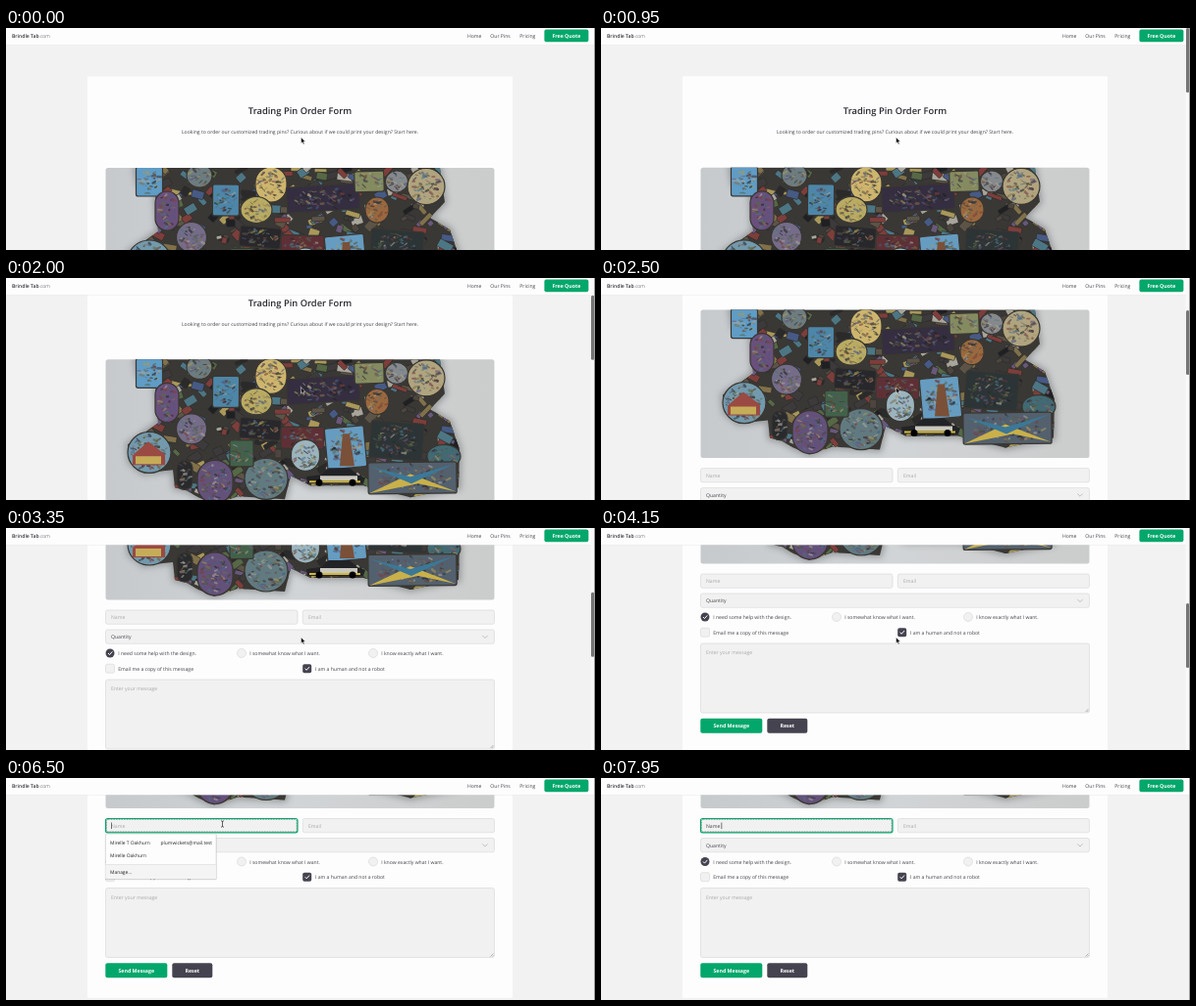
An HTML page that plays this animation: 600x227 px, repeating every 8 s.

```html
<!DOCTYPE html>
<html lang="en">
<head>
<meta charset="utf-8">
<title>Order form</title>
<style>
  html, body { margin: 0; width: 100%; height: 100%; overflow: hidden; background: #f2f2f2; }
  svg { display: block; width: 100%; height: 100%; }
  text { font: 400 5.1px "Open Sans", sans-serif; fill: #45444c; white-space: pre; text-rendering: geometricPrecision; }
  .heading { font-size: 9.35px; font-weight: 600; fill: #2b2a33; text-anchor: middle; }
  .middle { text-anchor: middle; }
  .brand { font-weight: 600; fill: #33323a; }
  .light { font-weight: 300; }
  .button { font-size: 5.25px; font-weight: 700; fill: #fff; text-anchor: middle; }
  .hint { fill: #a9a9ad; }
  .menu text { font-size: 4.9px; fill: #222; }
  .menu .entry { font-weight: 500; }
  .field { fill: #f1f1f1; stroke: #d6d6d8; stroke-width: .6; }
  .dark { fill: #45434f; }
  .green { fill: #04a76b; }
</style>
</head>
<body>
<svg id="stage" viewBox="0 0 600 227"></svg>
<script>
const LOOP = 8000, STEP = 50;
const CLICK = 5450;
const KEY_TIMES = [7000, 7150, 7300, 7450, 7700];
const TYPED = 'Name ';
// time, scroll offset, speed in px per ms
const SCROLL = [[900, 0, 0], [1550, 25.3, .06], [2500, 110.4, .11], [3350, 221, .09], [4150, 258, .05], [4250, 263.5, .03]];

let seed = 11;
const random = () => (seed = seed * 16807 % 2147483647) / 2147483647;
const between = (a, b) => a + (b - a) * random();
const pick = list => list[Math.floor(random() * list.length)];
const clamp = v => Math.max(0, Math.min(1, v));

const text = (x, y, words, cls = '') => `<text x="${x}" y="${y}" class="${cls}">${words}</text>`;
const box = (x, y, w, h, r, cls, extra = '') =>
  `<rect x="${x}" y="${y}" width="${w}" height="${h}" rx="${r}" class="${cls}" ${extra}/>`;
const button = (x, y, w, h, label, cls) =>
  box(x, y, w, h, 2, cls) + text(x + w / 2, y + h / 2 + 1.9, label, 'button');

function option(x, y, label, round, checked) {
  const tick = `<path d="M${x - 2} ${y}l1.5 1.6 2.8-3.2" fill="none" stroke="#fff" stroke-width="1"/>`;
  return box(x - 4.5, y - 4.5, 9, 9, round ? 4.5 : 1.8, checked ? 'dark' : 'field')
    + (checked ? tick : '') + text(x + 8.2, y + 2.1, label);
}

// centre x, centre y, width, height, colour, round
const PINS = [
  [146, 157, 27, 30, '#5f9cc6'], [197, 151, 26, 24, '#6d7c80', 1], [224, 176, 27, 32, '#4d86a8'],
  [270, 160, 32, 36, '#cdb56e', 1], [255, 186, 32, 27, '#b9ab62', 1], [164, 187, 24, 40, '#69507c', 1],
  [189, 214, 31, 31, '#746c88', 1], [146, 238, 44, 42, '#7399ac', 1], [259, 214, 42, 21, '#28272b'],
  [323, 174, 74, 26, '#342e40'], [370, 157, 30, 21, '#858b60'], [398, 157, 23, 22, '#85898c', 1],
  [428, 162, 38, 37, '#b0a47f', 1], [378, 186, 24, 26, '#99683f', 1], [302, 223, 44, 22, '#5e3036'],
  [346, 233, 40, 42, '#669cc0'], [398, 226, 54, 38, '#2c3436'], [446, 242, 34, 24, '#416a72', 1],
  [305, 241, 29, 32, '#9bb4be', 1], [414, 264, 90, 32, '#53606e'], [213, 268, 36, 44, '#63517a', 1],
  [265, 265, 44, 42, '#617a80', 1], [240, 239, 24, 27, '#42614a'], [182, 261, 16, 30, '#292a2c', 1]
];
const TINTS = ['#1f2023', '#2b2a2b', '#3d3a3b', '#4c463f', '#5c5447', '#80714b', '#a9985a', '#7d3e3b', '#4d7684', '#465a84', '#68587a', '#a8a59b', '#566846'];
const PILE = 'M132 143H442L447 178 432 194 452 206 462 235 461 274 412 284 364 272H310L290 262 284 286 236 283 212 291 196 284 184 277 172 274 170 256 140 259 126 248 124 230 155 208 152 165 135 160z';

function chip(x, y, w, h, colour, extra = '') {
  return `<rect x="${-w / 2}" y="${-h / 2}" width="${w}" height="${h}" rx="1" fill="${colour}" ${extra} transform="translate(${x} ${y}) rotate(${between(-50, 50)})"/>`;
}

function pin([x, y, w, h, colour, round]) {
  const tilt = round ? 0 : between(-7, 7);
  let art = `<g transform="rotate(${tilt} ${x} ${y})">`
    + `<rect x="${x - w / 2}" y="${y - h / 2}" width="${w}" height="${h}" rx="${round ? w / 2 : 2}" fill="${colour}" stroke="#393631" stroke-width="1.2"/>`;
  for (let i = 0; i < w * h / 24; i++) {
    const a = random() * 2 * Math.PI, r = Math.sqrt(random()) * .42;
    art += chip(x + Math.cos(a) * r * w, y + Math.sin(a) * r * h, between(2, 6), between(.8, 2.6), pick(TINTS), 'opacity=".6"');
  }
  return art + '</g>';
}

function photo() {
  let art = box(101.5, 143, 396, 151.5, 2.5, '', 'fill="url(#backdrop)"') + '<g clip-path="url(#photoClip)">'
    + `<path d="${PILE}" fill="#77797a" stroke="#77797a" stroke-width="5" opacity=".6" filter="url(#soft)"/>`
    + `<path d="${PILE}" fill="#3a3835"/><g clip-path="url(#pileClip)">`;
  for (let i = 0; i < 420; i++) {
    art += chip(between(124, 462), between(143, 290), between(5, 16), between(3, 9), pick(TINTS), 'stroke="#2c2a28" stroke-width=".6"');
  }
  art += '</g>' + PINS.map(pin).join('');
  // cottage, tower and racing car
  art += '<path d="M129 241l16-14 17 13v11h-33z" fill="#9a4a42"/><path d="M132 242h26v8h-26z" fill="#c6ac58"/>'
    + '<path d="M340 252l3-33h7l5 33z" fill="#7a5038"/>'
    + '<path d="M306 263l14-2 9-7h21l8 7 8 3-2 6h-57z" fill="#222326"/><path d="M320 262h38v5h-38z" fill="#c9c7bd"/>'
    + '<path d="M309 267h52v2h-52z" fill="#d1b83c"/><circle cx="319" cy="269" r="3.5"/><circle cx="353" cy="269" r="3.5"/>'
    + '<path d="M370 280l42-20 46 18-38-8z" fill="#c9b04a"/><path d="M372 253l40 10 44-13-43 20z" fill="#3b7898"/>';
  return art + '</g>';
}

const form = `
  ${box(101.5, 305, 195.5, 14.3, 2, 'field', 'id="nameField"')}
  ${box(302.3, 305, 195.2, 14.3, 2, 'field')}
  <rect id="focusDots" x="102.4" y="305.9" width="193.7" height="12.5" rx="1.5" fill="none" stroke="#28534a" stroke-width=".6" stroke-dasharray=".8 .8"/>
  ${text(107, 314.1, 'Name', 'hint').replace('<text', '<text id="nameText"')}
  <rect id="caret" y="309" width=".6" height="6.6" fill="#222"/>
  ${text(308, 314.1, 'Email', 'hint')}
  ${box(101.5, 325, 396, 14.3, 2, 'field')}
  ${text(107, 334.1, 'Quantity')}
  <path d="M485.3 330.9l2.7 2.7 2.7-2.7" fill="none" stroke="#aaa" stroke-width=".7"/>
  ${option(106, 349, 'I need some help with the design.', true, true)}
  ${option(240, 349, 'I somewhat know what I want.', true)}
  ${option(374, 349, 'I know exactly what I want.', true)}
  ${option(106, 364.7, 'Email me a copy of this message')}
  ${option(306.7, 364.7, 'I am a human and not a robot', false, true)}
  ${box(101.5, 376, 396, 71, 2, 'field')}
  ${text(107, 387.1, 'Enter your message', 'hint')}
  <path d="M493.5 446l3-3m-1.2 3l1.2-1.2" stroke="#777" stroke-width=".5"/>
  ${button(101.3, 452.7, 63, 15, 'Send Message', 'green')}
  ${button(169.3, 452.7, 41, 15, 'Reset', 'dark')}`;

const menu = `
  <g id="menu" class="menu">
    ${box(101, 321.5, 113.6, 46.3, .5, '', 'fill="#000" opacity=".12"')}
    ${box(101.3, 320.6, 112.8, 46, .5, '', 'fill="#fdfdfd" stroke="#c4c4c4" stroke-width=".5"')}
    ${box(101.5, 352, 112.4, 14.4, 0, '', 'fill="#f4f4f4"')}
    <path d="M101.5 352h112.4" stroke="#d2d2d2" stroke-width=".5"/>
    ${text(106, 331.4, 'Mirelle T Oakhurn', 'entry')}
    <text x="210" y="331.4" text-anchor="end">plumwickets@mail.test</text>
    ${text(106, 344.4, 'Mirelle Oakhurn', 'entry')}
    ${text(106, 361.3, 'Manage...')}
  </g>`;

const stage = document.getElementById('stage');
stage.innerHTML = `
  <defs>
    <linearGradient id="backdrop"><stop stop-color="#c6cacd"/><stop offset=".5" stop-color="#d1d4d6"/><stop offset="1" stop-color="#cbcccc"/></linearGradient>
    <filter id="soft"><feGaussianBlur stdDeviation="3"/></filter>
    <clipPath id="photoClip"><rect x="101.5" y="143" width="396" height="151.5" rx="2.5"/></clipPath>
    <clipPath id="pileClip"><path d="${PILE}"/></clipPath>
  </defs>
  <rect width="600" height="227" fill="#f2f2f2"/>
  <g id="page">
    ${box(83, 49.5, 433, 439, 1, '', 'fill="#fdfdfd"')}
    ${text(299.5, 88.2, 'Trading Pin Order Form', 'heading')}
    ${text(299.5, 108.4, 'Looking to order our customized trading pins? Curious about if we could print your design? Start here.', 'middle')}
    ${photo()}${form}${menu}
  </g>
  <rect width="600" height="17.4" fill="#e6e6e6"/>
  <rect width="600" height="17" fill="#fdfdfd"/>
  <text x="6" y="9.7" class="brand">Brindle Tab<tspan class="light">.com</tspan></text>
  ${text(470, 9.8, 'Home')}${text(493.3, 9.8, 'Our Pins')}${text(523.3, 9.8, 'Pricing')}
  ${button(548.4, 1.4, 45, 12.8, 'Free Quote', 'green')}
  <g id="scrollbar">
    <rect x="595.5" width="4.5" height="227" fill="#f8f8f8"/>
    <rect id="thumb" x="596" width="3.2" height="66" rx="1.5" fill="#747474"/>
  </g>
  <rect x="599" width="1" height="227" fill="#a2a2a2"/>
  <path id="arrow" d="M0 0v6.2l1.4-1.3 1.1 2.4 1.1-.5-1.1-2.3h2z" fill="#111" stroke="#fff" stroke-width=".5"/>
  <path id="beam" d="M-1.4-3.2q1.4 0 1.4 1v4.4q0 1-1.4 1m2.8-6.4q-1.4 0-1.4 1m0 4.4q0 1 1.4 1" fill="none" stroke="#222" stroke-width=".7"/>`;

const el = id => document.getElementById(id);
const show = (id, visible) => el(id).setAttribute('visibility', visible ? 'visible' : 'hidden');
const move = (id, x, y) => el(id).setAttribute('transform', `translate(${x} ${y})`);

function scrollAt(t) {
  if (t <= SCROLL[0][0]) return 0;
  const i = SCROLL.findIndex(key => key[0] >= t);
  if (i < 0) return SCROLL[SCROLL.length - 1][1];
  const [t0, y0, v0] = SCROLL[i - 1], [t1, y1, v1] = SCROLL[i];
  const d = t1 - t0, u = (t - t0) / d, w = 1 - u;
  return w * w * ((1 + 2 * u) * y0 + u * d * v0) + u * u * ((3 - 2 * u) * y1 - w * d * v1);
}

function draw(t) {
  const scroll = scrollAt(t);
  move('page', 0, -scroll);
  el('thumb').setAttribute('y', scroll * .298);
  el('scrollbar').setAttribute('opacity', Math.min(clamp((t - 850) / 100), clamp((4900 - t) / 250)));

  const count = KEY_TIMES.filter(k => t >= k).length;
  const focused = t >= CLICK;
  const name = el('nameText');
  name.textContent = count ? TYPED.slice(0, count) : 'Name';
  name.setAttribute('class', count ? '' : 'hint');
  el('nameField').style.cssText = focused ? 'stroke:#04a76b;stroke-width:1.2' : '';
  show('focusDots', focused);
  show('menu', focused && !count);

  const lastInput = count ? KEY_TIMES[count - 1] : CLICK;
  show('caret', focused && Math.floor((t - lastInput) / 500) % 2 === 0);
  el('caret').setAttribute('x', 107 + (count ? name.getComputedTextLength() : 0));

  const u = clamp((t - 4400) / 700), ease = u * u * (3 - 2 * u);
  const x = 300.5 - 80 * ease, y = 111.8 - 64.8 * ease;
  const overField = y < 56 && y > 41;
  move('arrow', x, y);
  move('beam', x, y);
  show('arrow', !overField);
  show('beam', overField && !count);
}

const start = performance.now();
function tick() {
  const t = (performance.now() - start) % LOOP;
  draw(Math.floor(t / STEP) * STEP);
  requestAnimationFrame(tick);
}
tick();
</script>
</body>
</html>
```
